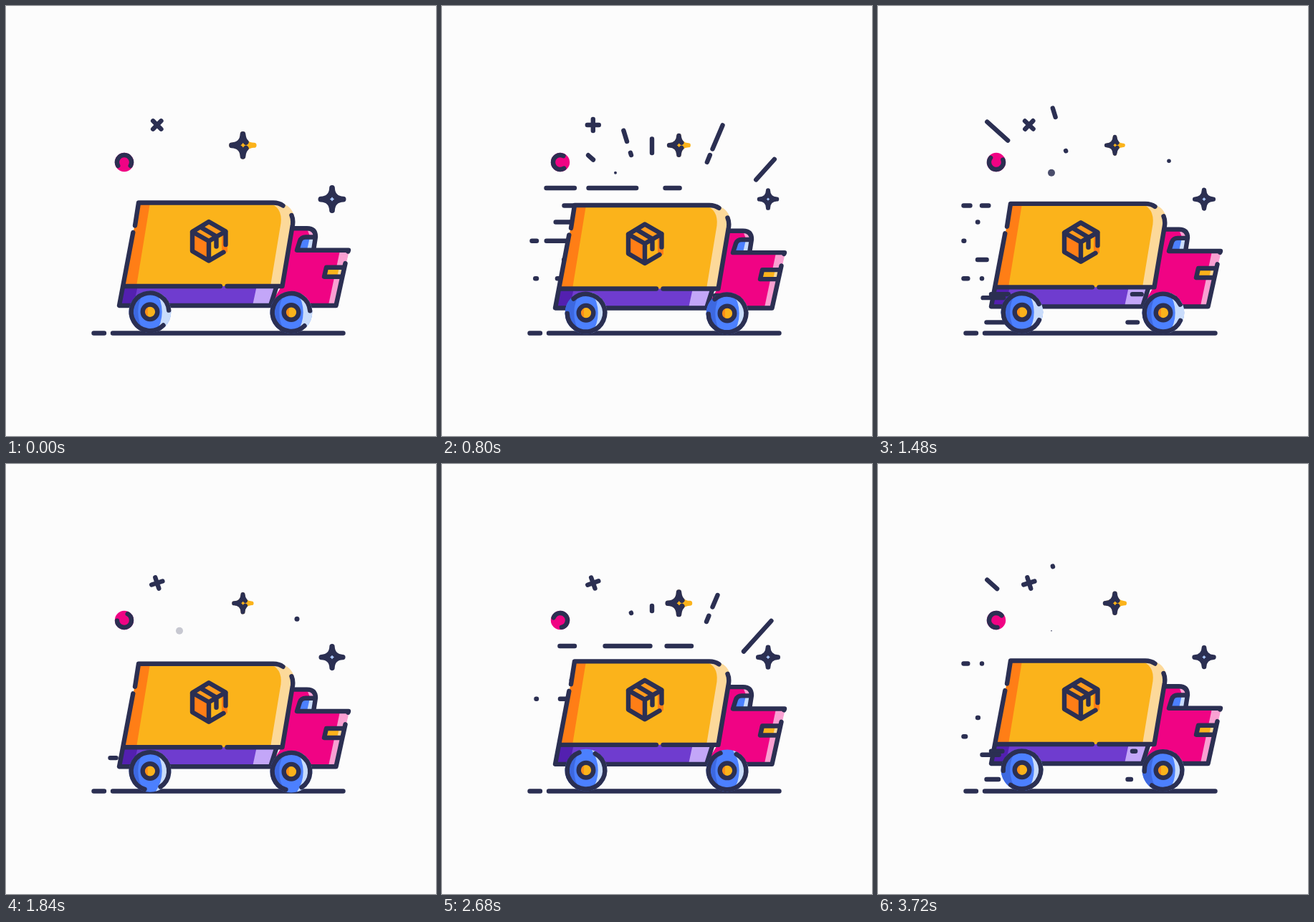
These frames come from a looping animation (600x600 px, 3.76 s). An HTML page:

```html
<!DOCTYPE html>
<html lang="en">
<head>
<meta charset="utf-8">
<title>Delivery truck</title>
<style>
html, body { margin: 0; width: 100%; height: 100%; overflow: hidden; background: #fcfcfc; }
svg { display: block; width: 100vw; height: 100vh; }
.ink { fill: none; stroke: #2b2f52; stroke-width: 6.4; stroke-linecap: round; stroke-linejoin: round; }
.star { stroke-width: 7.6; }
</style>
</head>
<body>
<svg viewBox="0 0 600 600">
  <defs>
    <g id="tire">
      <circle r="29.3" fill="#4c80ff"/>
      <path fill="#c9dcfb" d="M8 -28.2A29.3 29.3 0 0 1 8 28.2A50 50 0 0 0 8 -28.2Z"/>
      <path fill="#3d68e0" d="M-8 -28.2A29.3 29.3 0 0 0 -8 28.2A50 50 0 0 1 -8 -28.2Z"/>
      <circle r="10.3" fill="#fbb31b"/>
      <path fill="#ff8f18" d="M-3 -9A9 9 0 0 0 -3 9Z"/>
      <circle r="10.3" class="ink"/>
    </g>
    <path id="spark" d="M0 -15.400Q.5 -.5 15.400 0Q.5 .5 0 15.400Q-.5 .5 -15.400 0Q-.5 -.5 0 -15.400Z"/>
  </defs>

  <g id="air" class="ink"></g>
  <path class="ink" d="M122.500 456.500H137M149 456.500H470.500"/>

  <g id="truck">
    <!-- cabin -->
    <path fill="#f00384" d="M400 310H421Q432 311 432 322L429 340.500H478.500L460.500 418H368L385 390Z"/>
    <path fill="#f9a0d2" d="M466 341H479L461 417H450Z"/>
    <path fill="#f9a0d2" d="M420 311Q431 311 432 321H424Z"/>
    <path fill="#4c80ff" d="M406 340.500L410 328Q412 322.500 418 322.500H431L429 340.500Z"/>
    <path fill="#c9dcfb" d="M424 322.500H431.500L429 340.500H420Z"/>
    <path fill="#fbb31b" d="M447 364.500H472L469 377.500H444Z"/>
    <path fill="#fcd99a" d="M465 364.500H472L469 377.500H462Z"/>
    <!-- chassis -->
    <path fill="#6f3ccf" d="M164 390H378L371 418H158Z"/>
    <path fill="#5320b0" d="M164 390H184L178 418H158Z"/>
    <path fill="#c3a6f8" d="M350 390H378L371 418H344Z"/>
    <!-- box -->
    <path fill="#fbb31b" d="M185 274.500H373Q401 276 400.500 303L385 391H165Z"/>
    <path fill="#ff7e16" d="M185 274.500H201L182 391H165Z"/>
    <path fill="#fcd99a" d="M366 274.500H373C389 273 403 282 402.500 300L385 391H369L383.500 303Q386 280 366 274.500Z"/>
    <g class="ink">
      <path d="M180 306.500L185 274.500H373Q381 274.500 386.500 278.500"/>
      <path d="M398.500 292Q401 298 400 305L385.500 391H308.500M299 391H166"/>
      <path d="M177.300 316L158 418H460.500L473.500 359"/>
      <path d="M377 393L370 415"/>
      <path d="M401 310.300H420Q432 310.500 432 322L429.500 338"/>
      <path d="M430 322.500H418Q412 322.500 410 328L406 340.700H478L477.300 342.500"/>
      <path d="M471 364.700H447L444 377.700H468"/>
    </g>
    <!-- parcel -->
    <path fill="#fbb31b" d="M283 301L307 314.500V342L283 355.500Z"/>
    <path fill="#ff7e16" d="M260 315L283 328V355.500L260 342Z"/>
    <path fill="#ff9a1c" d="M260 315L283 301L307 314.500L283 328Z"/>
    <path fill="#ff7e16" d="M301 318H309V343L301 347Z"/>
    <path class="ink" d="M306.500 333V314.500L283 301L260 315V342L283 355.500L303.500 343.500M260 315L283 328L306.500 314.500M283 328V355M271.500 308.500L293.500 321.500V335.500"/>
    <g id="wake" class="ink"></g>
  </g>

  <g id="wheels"></g>

  <g transform="translate(165 218)">
    <circle r="13.200" fill="#f00384"/>
    <path id="ring" class="ink"/>
  </g>
  <path id="cross" class="ink" d="M-8 0H8M0 -8V8"/>
  <g id="starA">
    <use href="#spark" fill="#fbb31b" stroke="#fbb31b" stroke-width="7" stroke-linejoin="round"/>
    <path class="ink star" d="M4.300 -4.300Q.7 -8 0 -15.400Q-.5 -.5 -15.400 0Q-.5 .5 0 15.400Q.7 8 4.300 4.300"/>
  </g>
  <g id="starB">
    <use href="#spark" class="ink star" style="fill:#a9c8ff"/>
  </g>
  <circle id="dotA" cx="242" cy="232.800" fill="#2b2f52"/>
  <circle id="dotB" cx="406" cy="216.300" fill="#2b2f52"/>
</svg>
<script>
const LOOP = 3760, CYCLE = 2120, TAU = Math.PI * 2;
const HEAD = 500, TAIL = 470, STEP = 105;
const $ = id => document.getElementById(id);
const clamp = x => Math.min(1, Math.max(0, x));
const wave = (t, period) => Math.cos(TAU * t / period);

function add(parent, tag, attrs = {}) {
  const el = document.createElementNS('http://www.w3.org/2000/svg', tag);
  for (const k in attrs) el.setAttribute(k, attrs[k]);
  parent.appendChild(el);
  return el;
}

// Every stroke grows from its first point, then shrinks into its last
const strokes = [];
function stroke(group, start, x1, y1, x2, y2) {
  strokes.push({ el: add($(group), 'line'), start, x1, y1, x2, y2 });
}

// Dashes over the roof, one after another from the right
[[348, 311.5], [290.5, 204.5], [185, 145.5]].forEach(([x1, x2], i) =>
  stroke('air', 90 + STEP * i, x1, 254, x2, 254));

// Rays, also from the right: foot, angle from upright, length
[
  [421, 261.5, 42, 64], [369, 220, 22, 13], [377.5, 199.5, 23, 37.5], [293, 205, 0, 26],
  [264, 208, -18, 6.3], [258, 189, -17, 48.5], [211, 214.5, -48, 79]
].forEach(([x, y, deg, len], i) => {
  const a = deg * Math.PI / 180;
  stroke('air', 112 + STEP * i, x, y, x + len * Math.sin(a), y - len * Math.cos(a));
});

// Speed lines behind the box; every second row has a short follow-up
[[278.5, 620], [301.5, 515], [327.8, 310], [354, 640], [380.3, 500]].forEach(([y, start], i) => {
  const even = i % 2 === 0;
  stroke('air', start, 185, y, even ? 145 : 139, y);
  if (even) stroke('air', start + 230, 132, y, 119.5, y);
});

// Ring arc of radius r with a gap in degrees, centred on angle 0
function openArc(r, gap) {
  const a = gap * Math.PI / 360, x = r * Math.cos(a), y = r * Math.sin(a);
  return `M${x} ${y}A${r} ${r} 0 1 1 ${x} ${-y}`;
}
$('ring').setAttribute('d', openArc(10, 122));

const wheels = [[398, 427.5], [201, 426.8]].map(([x, y], i) => {
  const g = add($('wheels'), 'g');
  add(g, 'use', { href: '#tire' });
  const start = 690 + 160 * i;
  stroke('wake', start, x - 10, 400.8, x - 43, 400.8);
  stroke('wake', start, x - 14, 440, x - 49.5, 440);
  return { x, y, g, rim: add(g, 'path', { class: 'ink', d: openArc(26.3, 50) }) };
});
stroke('wake', 1000, 175, 405.8, 145.5, 405.8);

function drawStroke(s, v) {
  const age = v - s.start;
  const on = age >= 0 && age <= HEAD + TAIL + 15;
  s.el.style.display = on ? '' : 'none';
  if (!on) return;
  const head = clamp(age / HEAD), tail = clamp((age - HEAD) / TAIL);
  const mix = (a, b, p) => a + (b - a) * p;
  s.el.setAttribute('x1', mix(s.x1, s.x2, tail) + 0.01);
  s.el.setAttribute('y1', mix(s.y1, s.y2, tail));
  s.el.setAttribute('x2', mix(s.x1, s.x2, head));
  s.el.setAttribute('y2', mix(s.y1, s.y2, head));
}

function drawDot(el, age, size) {
  el.setAttribute('r', age > 0 ? size * Math.sqrt(clamp(age / 300)) : 0);
  el.setAttribute('opacity', 1 - clamp((age - 640) / 600));
}

function put(el, x, y, extra = '') {
  el.setAttribute('transform', `translate(${x} ${y}) ${extra}`);
}

function draw(t) {
  const sec = t / 1000;
  const dip = 2.15 * (1 - wave(t + 10, LOOP / 3));
  put($('truck'), 0, dip);
  for (const w of wheels) {
    put(w.g, w.x, w.y + dip * 0.4);
    w.rim.setAttribute('transform', `rotate(${20 + 0.229 * t})`);
  }
  for (const s of strokes) drawStroke(s, t % CYCLE);
  $('ring').setAttribute('transform', `rotate(${90 - 0.1156 * t})`);
  put($('cross'), 210.8, 166, `rotate(${45 + 55 * sec + 1.84 * sec ** 3.5})`);
  put($('starA'), 330.5, 194.3, `scale(${0.885 + 0.125 * wave(t, 2940)})`);
  put($('starB'), 455, 269.6, `scale(${0.885 + 0.13 * wave(t, 2150)})`);
  drawDot($('dotA'), (t - 755 + 2958) % 2958, 5);
  drawDot($('dotB'), t - 1290, 3.5);
}

function tick() {
  draw(performance.now() % LOOP);
  requestAnimationFrame(tick);
}
tick();
</script>
</body>
</html>
```
